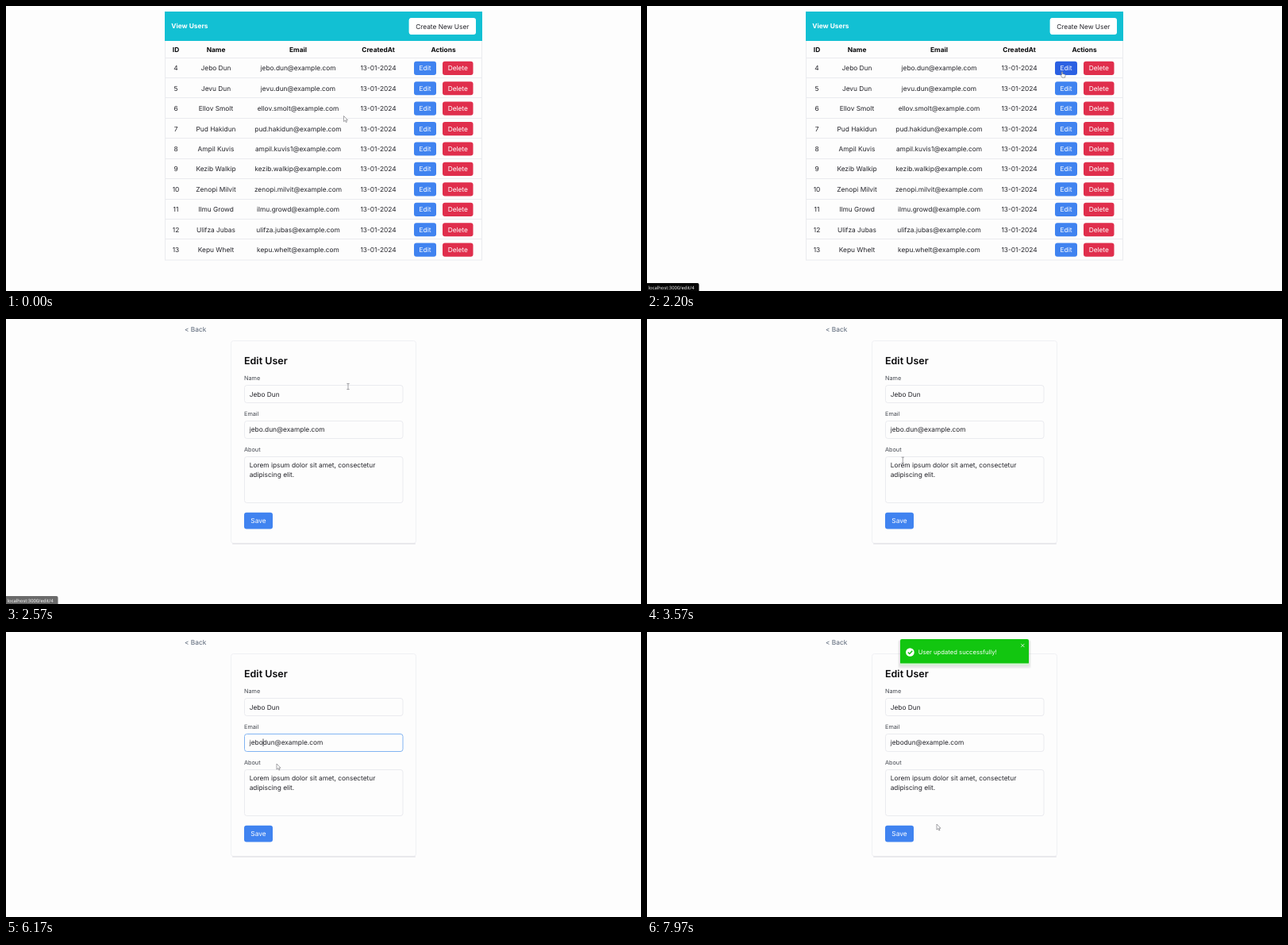
Write an HTML page that moves like this. It is 800 px wide and 359 px high and loops after 8000 ms.

```html
<!DOCTYPE html>
<html lang="en">
<head>
<meta charset="utf-8">
<title>User admin demo</title>
<style>
  html, body { margin: 0; height: 100%; overflow: hidden; background: #fdfdfd; }
  svg { display: block; width: 100vw; height: 100vh; }
  text { font: 8.33px Inter, sans-serif; fill: #24242a; white-space: pre; text-rendering: geometricPrecision; }
  .mid { text-anchor: middle; }
  .bold { font-weight: 700; fill: #08080a; }
  .white { fill: #fff; }
  .title { font-size: 12.5px; font-weight: 600; fill: #08080a; }
  .label { font-size: 7.29px; fill: #42464e; }
  .back { fill: #566274; }
  .toast { font-size: 7.7px; fill: #fff; }
  .status { font: 5.9px "Open Sans", sans-serif; fill: #fff; }
  .line { fill: none; stroke: #eaebef; }
  .cursor { fill: #fff; stroke: #6a6a70; stroke-width: .6; stroke-linejoin: round; }
</style>
</head>
<body>
<svg id="stage" viewBox="0 0 800 359"></svg>
<script>
const LOOP = 8000;
const CYAN = '#12c0d3', GREEN = '#12c610';
const BLUE = '#4083f0', BLUE_HOVER = '#2b60e2', RED = '#e02e4c', RED_HOVER = '#be1c3e';
const ROW = 25.43;
const OPEN_FORM = 2430, FOCUS = 4250, EDIT = 4500, SUBMIT = 6600, TOAST = 7600;
const stage = document.getElementById('stage');

function add(parent, tag, attrs, content) {
  const node = document.createElementNS('http://www.w3.org/2000/svg', tag);
  for (const key in attrs) node.setAttribute(key, attrs[key]);
  if (content) node.textContent = content;
  parent.append(node);
  return node;
}
const group = parent => add(parent, 'g', {});
const rect = (parent, x, y, width, height, attrs) => add(parent, 'rect', { x, y, width, height, ...attrs });
const label = (parent, x, y, content, cls = '') => add(parent, 'text', { x, y, class: cls }, content);
const path = (parent, d, attrs) => add(parent, 'path', { d, ...attrs });
const show = (node, on) => node.setAttribute('visibility', on ? 'inherit' : 'hidden');
const area = (x, y, w, h) => (px, py) => px >= x && px <= x + w && py >= y && py <= y + h;

// Returns a function that sets the hover colour and reports the hover
function button(parent, x, y, w, h, content, fill, hover, cls = 'white') {
  const box = rect(parent, x, y, w, h, { rx: 3, fill });
  label(parent, x + w / 2, y + h / 2 + 3, content, 'mid ' + cls);
  const hit = area(x, y, w, h);
  return (px, py) => {
    const over = hit(px, py);
    box.setAttribute('fill', over ? hover : fill);
    return over;
  };
}

// List page
const people = ['Jebo Dun', 'Jevu Dun', 'Ellov Smolt', 'Pud Hakidun', 'Ampil Kuvis',
  'Kezib Walkip', 'Zenopi Milvit', 'Ilmu Growd', 'Ulifza Jubas', 'Kepu Whelt'];
const columns = { ID: 214, Name: 264.5, Email: 368, CreatedAt: 469, Actions: 551 };
const centers = Object.values(columns);
const list = group(stage);
rect(list, 200.5, 7.5, 399, 312.5, { class: 'line' });
rect(list, 200, 7, 400, 37, { fill: CYAN });
label(list, 208.3, 28.3, 'View Users', 'bold').style.fill = '#fff';
const listButtons = [button(list, 507.6, 15, 84.4, 21, 'Create New User', '#fff', '#eef0f4', '')];
for (const name in columns) label(list, columns[name], 58, name, 'mid bold');
people.forEach((name, i) => {
  const y = 65.5 + i * ROW;
  const mail = name.toLowerCase().replace(' ', '.') + (i === 4 ? '1' : '') + '@example.com';
  path(list, `M200 ${Math.round(y) - .5}H600`, { class: 'line' });
  [String(i + 4), name, mail, '13-01-2024'].forEach((cell, c) => label(list, centers[c], y + 15.8, cell, 'mid'));
  listButtons.push(
    button(list, 514, y + 4.2, 28, 17.2, 'Edit', BLUE, BLUE_HOVER),
    button(list, 550, y + 4.2, 38.5, 17.2, 'Delete', RED, RED_HOVER));
});

// Form page
const form = group(stage);
label(form, 225, 16, '< Back', 'back');
const onBack = area(225, 8, 28, 10);
rect(form, 283.5, 27.5, 233, 255, { rx: 3, class: 'line', 'stroke-opacity': .7 });
rect(form, 285, 282, 231, 2, { rx: 1, fill: '#e9e9ec' });
label(form, 300, 57, 'Edit User', 'title');

const fields = ['Name', 'Email', 'About'].map((name, i) => {
  const y = 83.5 + i * 45, h = name === 'About' ? 58 : 22;
  label(form, 300, y - 6.6, name, 'label');
  const box = rect(form, 300.5, y, 199.5, h, { rx: 3, class: 'line' });
  return { box, hit: area(300, y, 200, h) };
});
label(form, 306.7, 97.6, people[0]);
const email = label(form, 306.7, 142.2, '');
label(form, 306.7, 186.7, 'Lorem ipsum dolor sit amet, consectetur');
label(form, 306.7, 199.2, 'adipiscing elit.');
const caret = rect(form, 0, 134.5, .8, 9.5, { fill: '#24242a' });
const ring = rect(form, 298, 242, 40, 24.5, { rx: 5, fill: 'none', stroke: '#bcd6fa', 'stroke-width': 3.5 });
const save = button(form, 300, 243.8, 36, 20.7, 'Save', BLUE, BLUE_HOVER);

// Toast
const toast = group(stage);
for (let n = 1; n < 4; n++)
  rect(toast, 319 - n, 1, 162 + 2 * n, 32 + n * 1.4, { rx: 3, opacity: .04 });
rect(toast, 319, 0, 162, 32, { rx: 2, fill: GREEN });
rect(toast, 319, 30.6, 162, 2.4, { fill: '#d5f4d4' });
add(toast, 'circle', { cx: 331.4, cy: 16.6, r: 5.3, fill: '#fff' });
path(toast, 'M328.8 16.7l1.9 1.9 3.6-3.8', { fill: 'none', stroke: GREEN, 'stroke-width': 1.4 });
label(toast, 341.7, 19.2, 'User updated successfully!', 'toast');
path(toast, 'M471.2 6l4.2 4.2m0-4.2l-4.2 4.2', { stroke: '#d8f6d8', 'stroke-width': .9 });

// Link address bubble
const status = group(stage);
path(status, 'M0 349H63.5Q65.5 349 65.5 351V359H0Z', { fill: '#060606' });
const address = label(status, 1.6, 356.8, '', 'status');

// Pointers
const pointers = {
  arrow: path(stage, 'M0 0V7.1L1.7 5.6 2.9 8.1 4 7.6 2.8 5.2H5Z', { class: 'cursor' }),
  beam: path(stage, 'M-1.7-3.6H1.7M0-3.6V3.6M-1.7 3.6H1.7', { class: 'cursor' }),
  hand: path(stage, 'M-.6 .5Q0-.5 .6 .5V3L3.5 3.7Q4.2 4 4 5L3.5 7.6H0L-2 4.8Q-1.8 3.8-.6 4.6Z', { class: 'cursor' })
};

// Pointer stops: arrival time, position, rest
const stops = [
  { at: 0, x: 425.5, y: 138.5, rest: 30 },
  { at: 330, x: 203, y: 23 },
  { at: 830, x: 586, y: 306, rest: 40 },
  { at: 1230, x: 560, y: 25, rest: 430 },
  { at: 1800, x: 523, y: 82.5, rest: 630 },
  { at: 2570, x: 431, y: 85 },
  { at: 3600, x: 322, y: 178 },
  { at: 4000, x: 230, y: 13 },
  { at: 4240, x: 327, y: 139, rest: 230 },
  { at: 4620, x: 375, y: 135 },
  { at: 5270, x: 314, y: 242 },
  { at: 5700, x: 368, y: 105 },
  { at: 6170, x: 341, y: 166 },
  { at: 6500, x: 317, y: 254, rest: 470 },
  { at: 7590, x: 386, y: 235, rest: 190 },
  { at: 7970, x: 365, y: 242 }
];

const ramp = (t, from, to) => Math.min(1, Math.max(0, (t - from) / (to - from)));
const smooth = p => p * p * (3 - 2 * p);

function pointerAt(t) {
  const i = stops.findLastIndex(stop => stop.at <= t);
  const a = stops[i], b = stops[i + 1] || a;
  const p = a === b ? 0 : smooth(ramp(t, a.at + (a.rest || 0), b.at));
  return [a.x + (b.x - a.x) * p, a.y + (b.y - a.y) * p];
}

// Falls in from above the stage, then rings out like a damped spring
function toastOffset(u) {
  return u < 0 ? u - 44 : -44 * Math.exp(-u / 110) * Math.cos(2 * Math.PI * u / 280);
}

function render(t) {
  const [x, y] = pointerAt(t);
  const onForm = t >= OPEN_FORM;
  show(list, !onForm);
  show(form, onForm);

  let kind = 'arrow';
  if (onForm) {
    if (save(x, y) || onBack(x, y)) kind = 'hand';
    else if (fields.some(field => field.hit(x, y))) kind = 'beam';
  } else {
    for (const hover of listButtons) if (hover(x, y)) kind = 'hand';
  }
  for (const name in pointers) show(pointers[name], name === kind);
  pointers[kind].setAttribute('transform', `translate(${x} ${y})`);

  const edited = t >= EDIT;
  const focused = t >= FOCUS && t < SUBMIT;
  email.textContent = edited ? 'jebodun@example.com' : 'jebo.dun@example.com';
  fields[1].box.style.stroke = focused ? '#82b4f2' : '';
  caret.setAttribute('x', edited ? 323.6 : 325.9);
  show(caret, focused && (t - 3590) % 1060 < 530);
  show(ring, t >= SUBMIT && t < SUBMIT + 330);

  address.textContent = 'localhost:3000/' + (t < 1770 ? 'create' : 'edit/4');
  status.setAttribute('opacity', ramp(t, 1190, 1430) * (1 - ramp(t, 2510, 2660)));
  toast.setAttribute('transform', `translate(0 ${8.2 + toastOffset(t - TOAST)})`);
}

const start = performance.now();
function tick() {
  render((performance.now() - start) % LOOP);
  requestAnimationFrame(tick);
}
tick();
</script>
</body>
</html>
```
